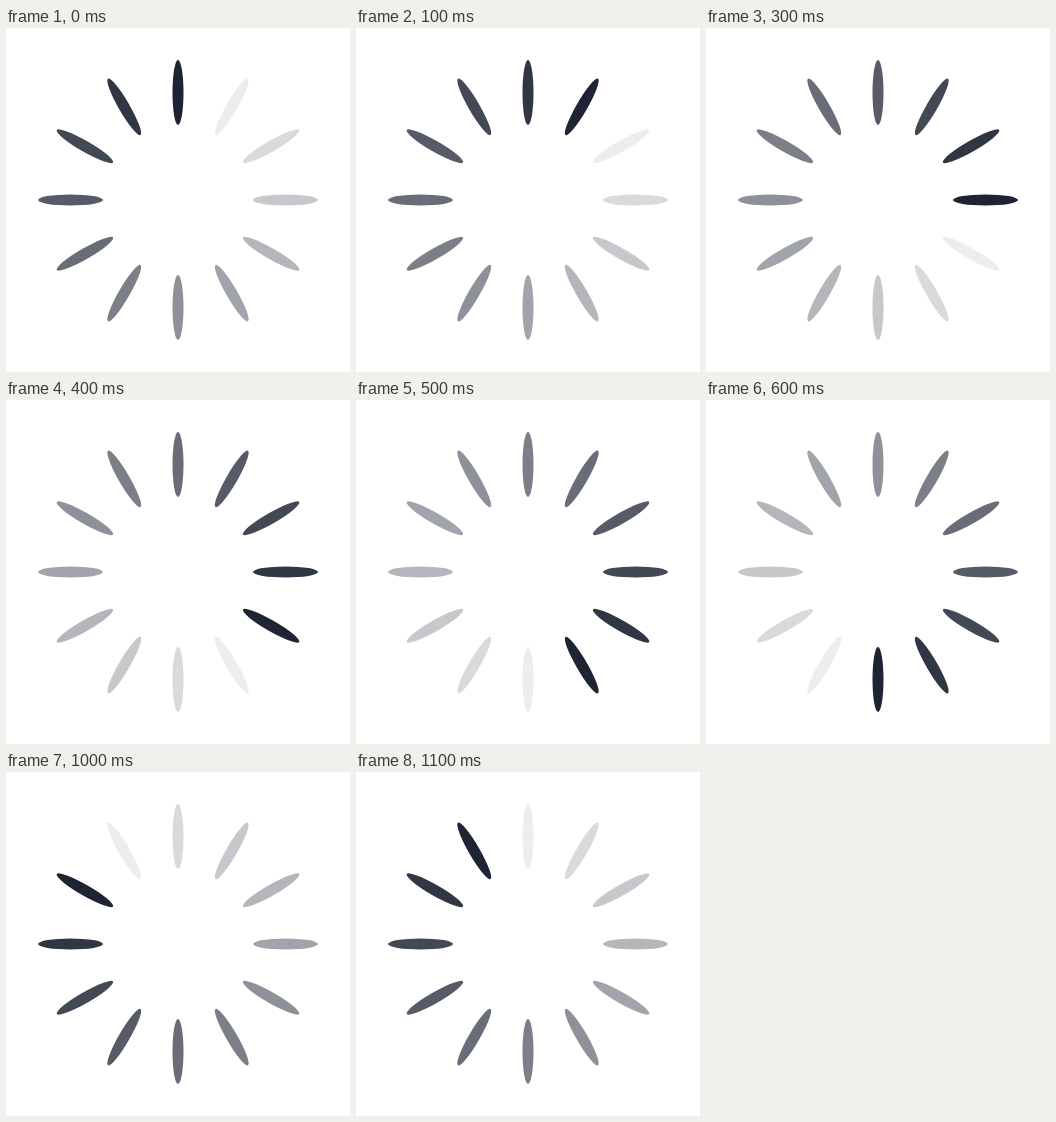
Write an HTML page with a canvas that moves like this. It is 344 px wide and 344 px high and loops after 1200 ms.

```html
<!DOCTYPE html>
<html lang="en">
<head>
<meta charset="utf-8">
<title>Spinner</title>
<style>
  html, body { margin: 0; width: 100%; height: 100%; overflow: hidden; background: #fff; }
  canvas { display: block; width: 344px; height: 344px; }
</style>
</head>
<body>
<canvas id="stage"></canvas>
<script>
  const SIZE = 344, COUNT = 12, STEP = 100;
  const RADIUS = 107.5, HALF_WIDTH = 5.5, HALF_LENGTH = 32.5;
  const canvas = document.getElementById('stage');
  const ctx = canvas.getContext('2d');
  const ratio = window.devicePixelRatio || 1;
  canvas.width = canvas.height = Math.round(SIZE * ratio);

  function drawPetal(index, alpha) {
    ctx.save();
    ctx.translate(SIZE / 2, SIZE / 2);
    ctx.rotate(index * 2 * Math.PI / COUNT);
    ctx.globalAlpha = alpha;
    ctx.beginPath();
    ctx.ellipse(0, -RADIUS, HALF_WIDTH, HALF_LENGTH, 0, 0, 2 * Math.PI);
    ctx.fill();
    ctx.restore();
  }

  function draw(time) {
    const head = Math.floor(time / STEP) % COUNT;
    ctx.setTransform(ratio, 0, 0, ratio, 0, 0);
    ctx.fillStyle = '#fff';
    ctx.fillRect(0, 0, SIZE, SIZE);
    ctx.fillStyle = '#1f2434';
    for (let i = 0; i < COUNT; i++) {
      const age = (head - i + COUNT) % COUNT;
      drawPetal(i, 1 - age / COUNT);
    }
  }

  const start = performance.now();
  function tick() {
    draw(performance.now() - start);
    requestAnimationFrame(tick);
  }
  tick();
</script>
</body>
</html>
```
